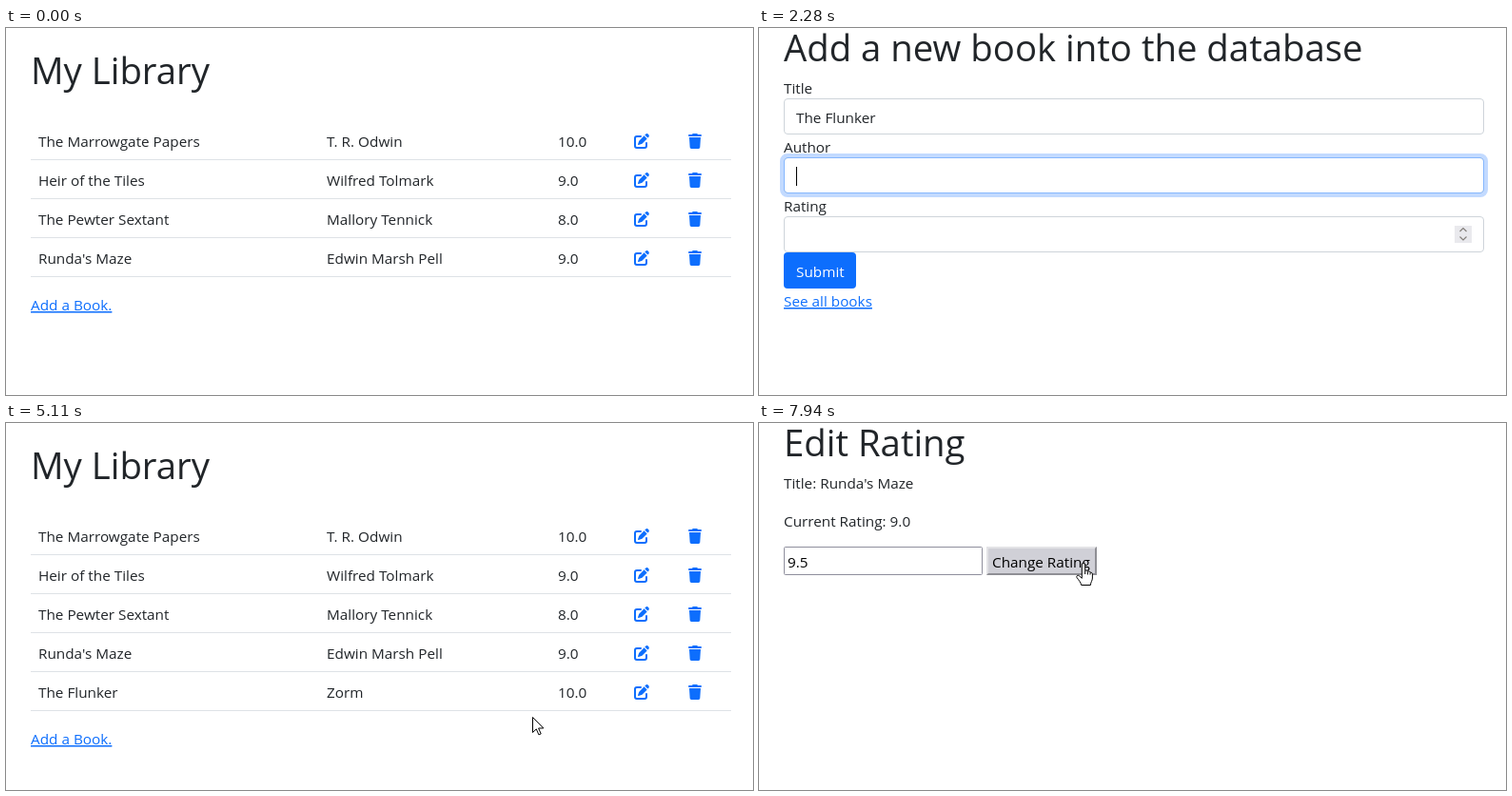
Animation of 785x386 px, one loop 8 s. Source, as an HTML page:

```html
<!DOCTYPE html>
<html lang="en">
<head>
<meta charset="utf-8">
<title>My Library</title>
<style>
html, body { margin: 0; width: 100%; height: 100%; overflow: hidden; background: #fff; }
svg { display: block; width: 785px; height: 386px; }
text { font: 15.3px "Open Sans", "Noto Sans", sans-serif; fill: #212529; white-space: pre; }
.h1 { font-size: 38.3px; }
.link { fill: #0d6efd; text-decoration: underline; }
.icon { color: #0d6efd; }
.field { fill: #fff; stroke: #ced4da; }
.halo { fill: none; stroke: #0d6efd; stroke-opacity: .25; stroke-width: 4; }
.edge { fill: none; stroke: #86b7fe; }
.black { fill: none; stroke: #000; }

/* 1% = 80 ms; everything switches hard except the pointer path */
.t, .row:nth-child(4) .edit, .row:nth-child(5) { animation: 8s step-end infinite; }

#list { animation-name: list; }
@keyframes list { 0% { opacity: 1 } 12.75% { opacity: 0 } 51.125% { opacity: 1 } 83.625% { opacity: 0 } }
.row:nth-child(5) { animation-name: newRow; }
@keyframes newRow { 0% { opacity: 0 } 51.125% { opacity: 1 } }
#add { animation-name: add; }
@keyframes add {
  0% { transform: none; fill: #0d6efd }
  10.2% { transform: none; fill: #0a58ca }
  12.75% { transform: translateY(41px); fill: #0d6efd }
}
.row:nth-child(4) .edit { animation-name: editHover; }
@keyframes editHover { 0% { color: #0d6efd } 78.75% { color: #0a58ca } 83.625% { color: #0d6efd } }

#form { animation-name: form; }
@keyframes form { 0% { opacity: 0 } 12.75% { opacity: 1 } 51.125% { opacity: 0 } }
#titleRing { animation-name: titleRing; }
@keyframes titleRing { 0% { opacity: 0 } 22.5% { opacity: .5 } 23.375% { opacity: 1 } 27.5% { opacity: .5 } 28.4% { opacity: 0 } }
#authorRing { animation-name: authorRing; }
@keyframes authorRing { 0% { opacity: 0 } 27.5% { opacity: .5 } 28.4% { opacity: 1 } 41.625% { opacity: .5 } 42.5% { opacity: 0 } }
#ratingRing { animation-name: ratingRing; }
@keyframes ratingRing { 0% { opacity: 0 } 41.625% { opacity: .5 } 42.5% { opacity: 1 } 47.75% { opacity: .5 } 48.6% { opacity: 0 } }
#titleText { animation-name: titleText; }
@keyframes titleText { 0% { opacity: 0 } 25% { opacity: 1 } }
#authorText { animation-name: authorText; }
@keyframes authorText { 0% { opacity: 0 } 31.75% { opacity: 1 } }
#ratingText { animation-name: ratingText; }
@keyframes ratingText { 0% { opacity: 0 } 43.375% { opacity: 1 } }
#caret { animation-name: caret; }
@keyframes caret {
  0% { opacity: 0; transform: translate(39px, 84px) }
  22.5% { opacity: 1; transform: translate(39px, 84px) }
  25% { opacity: 1; transform: translate(122px, 84px) }
  27.5% { opacity: 1; transform: translate(39px, 146px) }
  31.75% { opacity: 1; transform: translate(77px, 146px) }
  38.375% { opacity: 0; transform: translate(77px, 146px) }
  41.625% { opacity: 1; transform: translate(39px, 208px) }
  43.375% { opacity: 1; transform: translate(57px, 208px) }
  47.75% { opacity: 0; transform: translate(57px, 208px) }
}
#submit { animation-name: submit; }
@keyframes submit { 0% { fill: #0d6efd } 46.875% { fill: #0b5ed7 } }

#edit { animation-name: edit; }
@keyframes edit { 0% { opacity: 0 } 83.625% { opacity: 1 } }
#editRing { animation-name: editRing; }
@keyframes editRing { 0% { opacity: 0 } 92.25% { opacity: 1 } 98.375% { opacity: 0 } }
#editText { animation-name: editText; }
@keyframes editText { 0% { opacity: 0 } 94% { opacity: 1 } }
#change { animation-name: change; }
@keyframes change { 0% { fill: #e9e9ed } 98.375% { fill: #d0d0d7 } }

#arrow { animation-name: arrow; }
@keyframes arrow {
  0% { opacity: 0 } 2.375% { opacity: 1 } 10.2% { opacity: 0 }
  44.25% { opacity: 1 } 46.875% { opacity: 0 }
  51.125% { opacity: 1 } 78.75% { opacity: 0 }
  81.875% { opacity: 1 } 90% { opacity: 0 }
  96.5% { opacity: 1 } 98.375% { opacity: 0 }
}
#hand { animation-name: hand; }
@keyframes hand {
  0% { opacity: 0 } 10.2% { opacity: 1 } 15.25% { opacity: 0 }
  46.875% { opacity: 1 } 51.125% { opacity: 0 }
  78.75% { opacity: 1 } 81.875% { opacity: 0 } 98.375% { opacity: 1 }
}
#beam { animation-name: beam; }
@keyframes beam {
  0% { opacity: 0 } 15.25% { opacity: 1 } 25% { opacity: 0 }
  90% { opacity: 1 } 94% { opacity: 0 } 94.875% { opacity: 1 } 96.5% { opacity: 0 }
}
#pointer { animation: pointer 8s linear infinite; }
@keyframes pointer {
  0%, 2.375% { transform: translate(427px, 365px) }
  4.125% { transform: translate(313px, 354px) }
  5.875% { transform: translate(240px, 335px) }
  7.625% { transform: translate(160px, 315px) }
  9.375% { transform: translate(115px, 301px) }
  11.125%, 12.75% { transform: translate(82px, 288px) }
  14.5% { transform: translate(87px, 262px) }
  16% { transform: translate(88px, 230px) }
  18%, 18.8% { transform: translate(69px, 139px) }
  20.625%, 43.5% { transform: translate(69px, 97px) }
  44.25% { transform: translate(135px, 354px) }
  46% { transform: translate(112px, 312px) }
  48.6%, 51.1% { transform: translate(70px, 257px) }
  51.125%, 56.875% { transform: translate(68px, 256px) }
  58.6% { transform: translate(170px, 312px) }
  60.4% { transform: translate(335px, 345px) }
  62.1% { transform: translate(480px, 330px) }
  63.875%, 70.5% { transform: translate(553px, 309px) }
  74% { transform: translate(594px, 286px) }
  77.5% { transform: translate(650px, 256px) }
  80.25%, 83.625% { transform: translate(670px, 245px) }
  86.25% { transform: translate(500px, 212px) }
  88.75% { transform: translate(270px, 168px) }
  91.375% { transform: translate(80px, 146px) }
  93.125%, 94.875% { transform: translate(27px, 133px) }
  96.5% { transform: translate(238px, 156px) }
  97.5% { transform: translate(374px, 169px) }
  99.25%, 100% { transform: translate(341px, 148px) }
}
</style>
</head>
<body>
<svg viewBox="0 0 785 386">
  <defs>
    <g id="pen">
      <path d="M7 3H3a2 2 0 0 0-2 2v8a2 2 0 0 0 2 2h8a2 2 0 0 0 2-2v-3" fill="none" stroke="currentColor" stroke-width="2" stroke-linecap="round"/>
      <path d="M5.3 7.7 10.6 2.3l3.1 3.1-5.3 5.3q-.3.3-.7.4l-2.9 1c-.5.1-.9-.3-.8-.8l1-2.9q.1-.4.3-.7zM11.3 1.6l1-1c.7-.7 1.8-.7 2.4 0l.6.6c.7.7.7 1.8 0 2.5l-1 .9z" fill="currentColor"/>
    </g>
    <path id="bin" d="M4.2.5 3.9 1H1a1 1 0 0 0 0 2h12a1 1 0 0 0 0-2h-2.9L9.8.5A1 1 0 0 0 8.9 0H5.1a1 1 0 0 0-.9.5zM1 4l.7 10.6A1.5 1.5 0 0 0 3.2 16h7.6a1.5 1.5 0 0 0 1.5-1.4L13 4z" fill="currentColor"/>
    <g id="ring">
      <rect class="halo" x="24" y="-2" width="740" height="42" rx="6"/>
      <rect class="edge" x="26.5" y=".5" width="735" height="37" rx="3.5"/>
    </g>
    <rect id="field" class="field" x="26.5" y=".5" width="735" height="37" rx="3.5"/>
  </defs>

  <g id="list" class="t">
    <text class="h1" x="26" y="59">My Library</text>
    <g id="rows"></g>
    <text id="add" class="link t" x="26" y="297">Add a Book.</text>
  </g>

  <g id="form" class="t">
    <text class="h1" x="26" y="35">Add a new book into the database</text>
    <text x="26" y="69">Title</text>
    <text x="26" y="131">Author</text>
    <text x="26" y="193">Rating</text>
    <use href="#field" y="74"/>
    <use href="#field" y="136"/>
    <use href="#field" y="198"/>
    <rect x="731" y="208" width="18" height="18" fill="#e9e9ed"/>
    <path d="M736.5 214l3.5-3.5 3.5 3.5M736.5 219.5l3.5 3.5 3.5-3.5" fill="none" stroke="#85807c" stroke-width="1.2"/>
    <rect id="submit" class="t" x="26" y="236" width="76" height="38" rx="4"/>
    <text x="39" y="262" style="fill:#fff">Submit</text>
    <text class="link" x="26" y="293">See all books</text>
    <g id="titleRing" class="t"><use href="#ring" y="74"/></g>
    <g id="authorRing" class="t"><use href="#ring" y="136"/></g>
    <g id="ratingRing" class="t"><use href="#ring" y="198"/></g>
    <text id="titleText" class="t" x="39" y="100">The Flunker</text>
    <text id="authorText" class="t" x="39" y="162">Zorm</text>
    <text id="ratingText" class="t" x="39" y="224">10</text>
    <rect id="caret" class="t" width="1" height="20"/>
  </g>

  <g id="edit" class="t">
    <text class="h1" x="26" y="35">Edit Rating</text>
    <text x="26" y="69">Title: Runda's Maze</text>
    <text x="26" y="109">Current Rating: 9.0</text>
    <rect x="26.5" y="130.5" width="208" height="29" rx="1" fill="#fff" stroke="#8f8f9d"/>
    <rect id="editRing" class="t" x="25" y="129" width="211" height="32" rx="2" fill="none" stroke="#0078d7" stroke-width="2"/>
    <text id="editText" class="t" x="30" y="152" style="fill:#000">9.5</text>
    <rect id="change" class="t" x="239" y="130" width="116" height="30"/>
    <path d="M239 160v-30h116l-2 2H241v26z" fill="#e3e3e6"/>
    <path d="M239 160h116v-30l-2 2v26H241z" fill="#8f8f95"/>
    <text x="245" y="152" style="fill:#000">Change Rating</text>
  </g>

  <g id="pointer">
    <path id="arrow" class="t" d="M.5.5v16l3.8-3.6 2.6 6 2.3-1-2.6-5.9h5.2z" fill="#fff" stroke="#000"/>
    <g id="hand" class="t">
      <path d="M-1.7 1a1.7 1.7 0 0 1 3.4 0v6.5c1-.8 2.5-.4 2.7.8 1-.6 2.3-.2 2.6.9 1.2-.3 2.4.4 2.4 1.8v4c0 3-1.8 4-2 7.5H-2.3c-.2-2.5-3-5.5-4.7-8-.9-1.5 1-3 2.4-1.8l2.9 2.6z" fill="#fff" stroke="#000" stroke-linejoin="round"/>
      <path class="black" d="M1.7 7.5V11M4.4 8.5v3M7 9.5v2"/>
    </g>
    <path id="beam" class="t black" d="M-3-7.5h2.5M.5-7.5H3M-.5-7.5v15M-3 7.5h2.5M.5 7.5H3"/>
  </g>
</svg>
<script>
const books = [
  ["The Marrowgate Papers", "T. R. Odwin", "10.0"],
  ["Heir of the Tiles", "Wilfred Tolmark", "9.0"],
  ["The Pewter Sextant", "Mallory Tennick", "8.0"],
  ["Runda's Maze", "Edwin Marsh Pell", "9.0"],
  ["The Flunker", "Zorm", "10.0"]
];
const columns = [34, 337, 580];

document.getElementById("rows").innerHTML = books.map((book, i) => {
  const top = 98 + 41 * i;
  const cells = book.map((cell, c) => `<text x="${columns[c]}" y="${top + 27}">${cell}</text>`).join("");
  return `<g class="row">${cells}
    <use class="icon edit" href="#pen" x="660" y="${top + 13}"/>
    <use class="icon" href="#bin" x="717" y="${top + 13}"/>
    <rect x="26" y="${top + 40}" width="736" height="1" fill="#dee2e6"/>
  </g>`;
}).join("");
</script>
</body>
</html>
```
